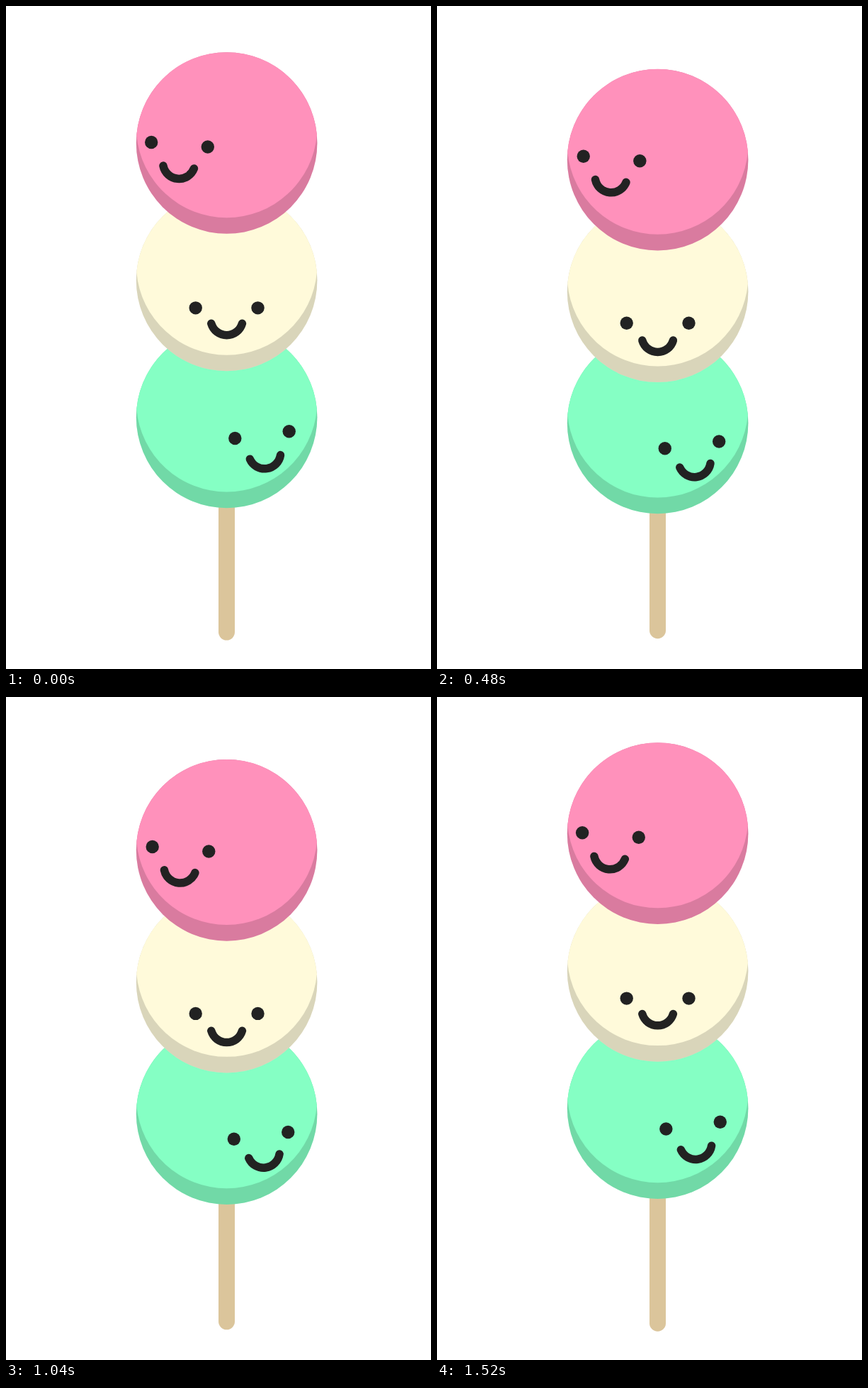
Recreate the animation shown at these times as an HTML page without scripts. Size 600 px wide and 934 px high, loop 1.56 s.

```html
<!DOCTYPE html>
<html lang="en">
<head>
<meta charset="utf-8">
<title>Bouncing dango</title>
<style>
  @property --drop {
    syntax: "<length>";
    inherits: true;
    initial-value: 0px;
  }
  html, body {
    margin: 0;
    width: 100%;
    height: 100%;
    overflow: hidden;
    background: #fff;
  }
  svg {
    display: block;
    width: 100vw;
    height: 100vh;
    animation: bounce 1560ms linear infinite;
  }
  /* --y and --x: share of the top ball's drop that a part follows */
  .part {
    transform: translate(calc(var(--drop) * var(--x, 0)), calc(var(--drop) * var(--y)));
  }
  .left { --x: .065; }
  .right { --x: -.065; }

  /* slow at the top, sharp turn at the bottom */
  @keyframes bounce {
    0% { --drop: 0px; }
    10.256% { --drop: 5.6px; }
    20.513% { --drop: 13.4px; }
    30.769% { --drop: 23.6px; }
    41.026% { --drop: 36.3px; }
    48.526% { --drop: 47.3px; }
    51.282% { --drop: 43.3px; }
    58.974% { --drop: 32.6px; }
    66.667% { --drop: 22.9px; }
    71.795% { --drop: 17.2px; }
    76.923% { --drop: 12.3px; }
    87.179% { --drop: 4.4px; }
    97.436%, 100% { --drop: -.8px; }
  }
</style>
</head>
<body>
<svg viewBox="0 0 600 934">
  <defs>
    <g id="ball">
      <circle r="127.8"/>
      <circle r="127.8" fill="#000" fill-opacity=".15"/>
      <path d="M-127.3 -11.4A127.8 127.8 0 0 1 127.3 -11.4A127.8 127.8 0 0 1 -127.3 -11.4Z"/>
    </g>
    <circle id="eye" r="9.2" fill="#222"/>
    <path id="smile" d="M-21.8 0A22.7 22.7 0 0 0 21.8 0" fill="none" stroke="#222" stroke-width="11.5" stroke-linecap="round"/>
  </defs>

  <rect class="part" style="--y:-.1" x="300" y="600" width="23" height="293.6" rx="11.5" fill="#dbc59b"/>

  <g class="part" style="--y:.34" fill="#85ffc4"><use href="#ball" x="311.6" y="579.4"/></g>
  <g class="part right" style="--y:.603">
    <use href="#eye" x="323.3" y="609"/>
    <use href="#eye" x="399.7" y="599.2"/>
  </g>
  <g class="part right" style="--y:.498"><use href="#smile" transform="translate(365.9 635.4) rotate(-7.4)"/></g>

  <g class="part" style="--y:.667" fill="#fffada"><use href="#ball" x="311.6" y="386.5"/></g>
  <g class="part" style="--y:.903">
    <use href="#eye" x="267.7" y="425.3"/>
    <use href="#eye" x="355.5" y="425.3"/>
  </g>
  <g class="part" style="--y:1.005"><use href="#smile" x="311.6" y="447.3"/></g>

  <g class="part" style="--y:1" fill="#ff91bb"><use href="#ball" x="311.6" y="193"/></g>
  <g class="part left" style="--y:.838">
    <use href="#eye" x="205.2" y="191.9"/>
    <use href="#eye" x="284.8" y="198.4"/>
  </g>
  <g class="part left" style="--y:.82"><use href="#smile" transform="translate(243.7 227) rotate(5)"/></g>
</svg>
</body>
</html>
```
